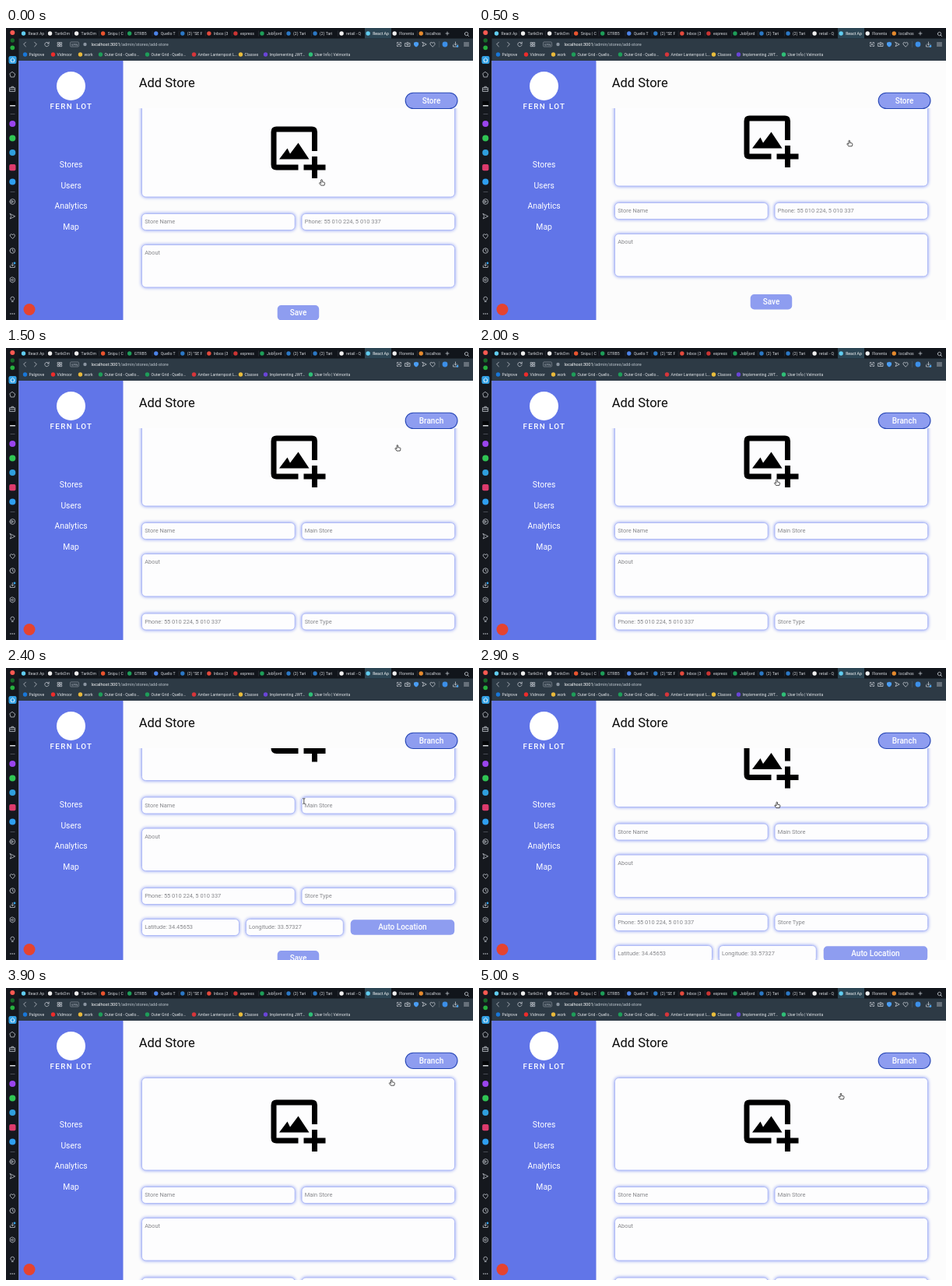
Animation, 600 px wide and 375 px high, one loop 5100 ms. Source, as an HTML page:

```html
<!DOCTYPE html>
<html lang="en">
<head>
<meta charset="utf-8">
<title>Add Store</title>
<style>
html, body { margin: 0; width: 100%; height: 100%; overflow: hidden; background: #fcfcfc; }
svg { display: block; width: 600px; height: 375px; }
text { font-family: Roboto, sans-serif; white-space: pre; }
.box { fill: #fdfdfe; stroke: #b0bbf6; stroke-width: 1; filter: drop-shadow(0 0 2.2px #8193f3); }
.line { fill: none; stroke: #bfc4cc; stroke-width: .8; stroke-linejoin: round; stroke-linecap: round; }
</style>
</head>
<body>
<svg id="stage" viewBox="0 0 600 375">
  <defs>
    <clipPath id="page"><rect x="152" y="103" width="448" height="272"/></clipPath>
  </defs>
  <rect width="600" height="375" fill="#fcfcfc"/>
  <g id="chrome"></g>
  <g id="side"></g>
  <g clip-path="url(#page)">
    <g id="form">
      <g id="shared"></g>
      <g id="storeForm"></g>
      <g id="branchForm"></g>
    </g>
  </g>
  <g id="head"></g>
  <g id="menu"></g>
  <g id="cursor">
    <path id="arrow" d="M0 0V8.2L1.9 6.5L3.2 9.3L4.4 8.8L3.2 6.1H5.8Z" fill="#111" stroke="#fff" stroke-width=".7"/>
    <path id="hand" d="M-.8 .6Q0-.5.8.6V3.2L3.4 3.7Q4.3 4 4.1 5L3.4 7.6H-.9L-2.9 4.9Q-3 3.9-2 4.1L-.8 5Z" fill="#fff" stroke="#222" stroke-width=".8" stroke-linejoin="round"/>
    <path id="beam" d="M-1.5-3.5Q0-3.5 0-2.5Q0-3.5 1.5-3.5M0-2.5V2.5M-1.5 3.5Q0 3.5 0 2.5Q0 3.5 1.5 3.5" fill="none" stroke="#222" stroke-width=".8"/>
  </g>
</svg>
<script>
const $ = id => document.getElementById(id);
const put = (id, parts) => { $(id).innerHTML = parts.join(''); };
const rect = (x, y, w, h, fill, r = 0, more = '') =>
  `<rect x="${x}" y="${y}" width="${w}" height="${h}" rx="${r}" fill="${fill}" ${more}/>`;
const dot = (x, y, r, fill) => `<circle cx="${x}" cy="${y}" r="${r}" fill="${fill}"/>`;
const text = (x, y, size, fill, str, more = '') =>
  `<text x="${x}" y="${y}" font-size="${size}" fill="${fill}" ${more}>${str}</text>`;
const mid = 'text-anchor="middle"';
const line = (x, y, d, more = '') => `<path class="line" transform="translate(${x} ${y})" d="${d}" ${more}/>`;
const ring = r => `M${-r} 0a${r} ${r} 0 1 0 ${2 * r} 0a${r} ${r} 0 1 0 ${-2 * r} 0`;
const heart = 'M0 3L-3 0Q-3.6-2.5-1.6-2.6Q-.4-2.6 0-1.4Q.4-2.6 1.6-2.6Q3.6-2.5 3 0Z';
const load = 'M0-3V1M-1.6-.6L0 1L1.6-.6M-3 .8V3H3V.8';

// Browser window
const tabs = [
  ['React Ap', '#61cdf0'], ['TarikOm', '#eee'], ['TarikOm', '#eee'], ['Snipu | C', '#e8542f'],
  ['GTRB5', '#1e9e59'], ['Quello T', '#4c83e8'], ['(2) "SE F', '#2b78c5'], ['Inbox (3', '#e34a3d'],
  ['express', '#cb3433'], ['Jobfjord', '#1e9e59'], ['(2) Tari', '#2b78c5'], ['(2) Tari', '#2b78c5'],
  ['retail - Q', '#f0f0f0'], ['React Ap', '#61cdf0'], ['Florenta', '#f0f0f0'], ['localhos', '#e58a2d']
];
const marks = [
  [24, 'Palgrove', '#1877d8'], [60, 'Vidmoor', '#ee2b2b'], [95, 'work', '#e9b93a'],
  [121, 'Outer Grid - Quello...', '#1e9e59'], [181, 'Outer Grid - Quello...', '#1e9e59'],
  [241, 'Amber Lanternpost L...', '#d8353a'], [301, 'Classes', '#e9bd3c'],
  [333, 'Implementing JWT...', '#6a45d8'], [391, 'User Info | Velmorita', '#2fbf77']
];
const active = 13;
const tabX = i => 22.5 + i * 34.05;
const chrome = [
  rect(0, 0, 600, 42, '#2d3a45'),
  rect(0, 0, 600, 13.5, '#11151b'),
  rect(461, 0, 34, 13.5, '#2d4654')
];
tabs.forEach(([name, color], i) => {
  const x = tabX(i);
  if (i && i !== active && i !== active + 1) chrome.push(rect(x - 5, 3.5, .5, 7, '#3b3f49'));
  chrome.push(dot(x, 7, 2.7, color), text(x + 6, 8.9, 5.2, i === active ? '#fff' : '#d3d6db', name));
});
chrome.push(
  line(567, 7, 'M-2 0H2M0-2V2'),
  line(591.5, 7.5, ring(2.2) + 'M1.6 1.6L3.2 3.2'),
  line(24, 21, 'M1.4-2.8L-1.4 0L1.4 2.8'),
  line(38, 21, 'M-1.4-2.8L1.4 0L-1.4 2.8'),
  line(52.5, 21, 'M2.4-1.2A2.7 2.7 0 1 0 2.6 .8M2.7-3V-1H.7'),
  line(69, 21, 'M-2.5-2.5h2v2h-2zM.7-2.5h2v2h-2zM-2.5 .7h2v2h-2zM.7 .7h2v2h-2z'),
  rect(82.5, 18, 11, 6, 'none', 1.2, 'stroke="#9aa2ac" stroke-width=".6"'),
  text(88, 22.6, 4.2, '#b4bbc4', 'VPN', mid),
  dot(101.5, 21, 2.2, '#8a94a0'),
  `<text x="109.5" y="23" font-size="5.65" fill="#bcc4cc"><tspan fill="#fff">localhost:3001</tspan>/admin/stores/add-store</text>`,
  line(505, 21, 'M-2.5-1V-2.5H-1M1-2.5H2.5V-1M2.5 1V2.5H1M-1 2.5H-2.5V1' + ring(1)),
  line(516, 21, 'M-3-1.5H-1.4L-.8-2.5H.8L1.4-1.5H3V2.5H-3Z' + ring(1.1)),
  `<path d="M527 17.7l3 1v2.5q-.5 2.3-3 3.3q-2.5-1-3-3.3v-2.5z" fill="#4a9cf2"/>`,
  line(537.5, 21, 'M-2.5-2.7L2.7 0L-2.5 2.7L-1.2 0Z'),
  line(548, 21, heart),
  rect(556, 17, .6, 8, '#4f5a65'),
  dot(564, 21, 3.4, '#3c8fe8'),
  line(577.5, 21, load), dot(580, 23.4, 1.3, '#46a3f2'),
  line(591.5, 21, 'M-3-2H3M-3 0H3M-3 2H3')
);
marks.forEach(([x, name, color]) =>
  chrome.push(dot(x + .5, 34, 2.7, color), text(x + 5.5, 36, 5.05, '#e3e6ea', name)));

chrome.push(
  rect(0, 0, 16.5, 375, '#15181e'),
  dot(8.3, 6, 3, '#ff5a52'), dot(8.3, 16, 2.7, '#176a2a'), dot(8.3, 25.3, 2.9, '#27b13f'),
  rect(3.5, 36, 10, 10, '#319fe3', 2.2),
  line(8.5, 41, 'M-2.8 0L0-2.7L2.8 0M-2 0V2.6H2V0', 'style="stroke:#fff"'),
  line(8.3, 60, 'M0-3.5L3.4-1L2.2 3H-2.2L-3.4-1Z'),
  line(8.3, 78.5, 'M-3.3-1.8H3.3V3H-3.3ZM-1.3-1.8V-3.2H1.3V-1.8M-3.3 .4H3.3'),
  rect(4.5, 94, 8, 5, '#050608', 1), rect(5, 99, 7, 1.5, '#d9dbe0', .5),
  rect(5.5, 110, 6, .8, '#555963'),
  dot(8.3, 123, 4, '#9b45ee'), dot(8.3, 141.5, 4, '#30c554'), dot(8.3, 160, 4, '#2f9fdd'),
  rect(4.2, 175, 8.3, 8.3, '#dd3b6d', 2), dot(8.3, 197.5, 4, '#2f9ff0'),
  rect(5.5, 210, 6, .8, '#555963'),
  line(8.3, 223, ring(3.4) + 'M-1-1.4L1.4 0L-1 1.4Z'),
  line(8.3, 241.8, 'M-3-3.2L3.4 0L-3 3.2L-1.7 0Z'),
  line(8.3, 267.3, heart),
  line(8.3, 286, ring(3.3) + 'M0-2V0L1.5 1'),
  line(8.3, 304.5, load), dot(11, 302, 1.4, '#369ee8'),
  line(8.3, 323.5, 'M0-3.5L3-1.8V1.8L0 3.5L-3 1.8V-1.8Z' + ring(1.2)),
  line(8.3, 348.5, 'M-1.2 1.4Q-2.7 .2-2.4-1.2Q-2-3.3 0-3.3Q2-3.3 2.4-1.2Q2.7 .2 1.2 1.4ZM-1 3H1'),
  ...[-2.4, 0, 2.4].map(d => dot(8.3 + d, 367, .8, '#c5c8cf'))
);
put('chrome', chrome);

// Site navigation
put('side', [
  rect(16.5, 42, 134, 333, '#6175e8'),
  dot(83.5, 74.5, 18.5, '#fff'),
  text(84, 104, 9.8, '#fff', 'FERN LOT', mid + ' font-weight="500" letter-spacing="1.4"'),
  ...['Stores', 'Users', 'Analytics', 'Map'].map((s, i) => text(83.6, 179.1 + i * 26.65, 10.35, '#fff', s, mid)),
  dot(30, 361.5, 7.5, '#e5432f')
]);

// Form
const area = (x, y, w, h, label = '', dy = 12.9) =>
  `<rect class="box" x="${x}" y="${y}" width="${w}" height="${h}" rx="5"/>` + text(x + 3.7, y + dy, 7.45, '#85868a', label);
const button = (x, y, w, h, label) =>
  rect(x, y, w, h, '#8e9df0', 5) + text(x + w / 2, y + h / 2 + 3.5, 10, '#fff', label, mid + ' font-weight="500"');
const left = 174.5, right = 380, wide = 196.7;
const phone = 'Phone: 55 010 224, 5 010 337';

put('shared', [
  area(left, 115.5, 402, 118.5),
  `<g transform="translate(333.5 133) scale(3.5)">
     <path d="M18 12V5Q18 4 17 4H4Q3 4 3 5V17Q3 18 4 18H12M18 14V22M14 18H22" fill="none" stroke="#000" stroke-width="2"/>
     <path d="M8 11L5 15H16L12 9L9 13Z"/>
   </g>`,
  area(left, 255.5, wide, 21, 'Store Name'),
  area(left, 295.5, 402, 54.5, 'About')
]);
put('storeForm', [area(right, 255.5, wide, 21, phone), button(348.7, 373, 53.5, 19.5, 'Save')]);
put('branchForm', [
  area(right, 255.5, wide, 21, 'Main Store'),
  area(left, 372, wide, 21, phone),
  area(right, 372, wide, 21, 'Store Type'),
  area(left, 412, 125, 21, 'Latitude: 34.45653'),
  area(308.3, 412, 125, 21, 'Longitude: 33.57327'),
  button(442.7, 412.7, 133.5, 19.5, 'Auto Location'),
  button(348.7, 452.5, 53.5, 19.5, 'Save')
]);
put('head', [
  text(170.7, 76.3, 16.5, '#0b0b0b', 'Add Store'),
  rect(513.2, 83.2, 66.8, 20.3, '#8e9df0', 10.15, 'stroke="#2545b5" stroke-width="1.1"'),
  text(546.5, 96.9, 10, '#fff', 'Store', mid + ' font-weight="500" id="kind"')
]);

const inter = 'style="font-family:Inter,sans-serif"';
put('menu', [
  rect(510, 85.7, 67, 34, '#414859', 3, 'stroke="#2a303d" stroke-width=".8" style="filter:drop-shadow(0 1px 2px #0007)"'),
  rect(512, 102.7, 63, 14.8, '#3f89e2', 2),
  line(515.8, 95.2, 'M-1.5 .2L-.4 1.6L1.7-1.7', 'style="stroke:#fff"'),
  text(520, 98.4, 9.2, '#fff', 'Store', inter),
  text(520, 113.4, 9.2, '#fff', 'Branch', inter)
]);

// Motion: [time, value...]
const LOOP = 5100, STEP = 100, OPEN = 800, PICK = 1300;
const scroll = [[0, 17], [200, 31], [2000, 31], [2200, 55], [2400, 89.5], [2600, 111], [2700, 111], [3100, 0]];
const path = [
  [0, 405.5, 194.5], [300, 405.5, 194.5], [700, 546, 94], [900, 546, 95], [1100, 545, 107.5], [1300, 545, 109],
  [1900, 382.5, 168.8], [2100, 382.5, 168.8], [2400, 382.8, 171], [2900, 382.8, 172], [3100, 383, 176.3],
  [3300, 383, 176.3], [3900, 495.3, 117.6], [4200, 485, 123], [4800, 465, 135.2]
];
const linear = u => u;
const smooth = u => u * u * (3 - 2 * u);
function at(keys, t, ease) {
  const n = keys.findIndex(k => k[0] > t);
  if (n < 0) return keys[keys.length - 1].slice(1);
  const a = keys[n - 1], b = keys[n], u = ease((t - a[0]) / (b[0] - a[0]));
  return a.slice(1).map((v, i) => v + (b[i + 1] - v) * u);
}

function pointer(x, y, s, open) {
  if (open) return 'arrow';
  if (x > 513 && x < 580 && y > 83 && y < 104) return 'hand';
  if (y < 103 || x < left || x > 576.5) return 'arrow';
  const py = y + s;
  if (py > 115.5 && py < 234) return 'hand';
  const inField = (py > 255.5 && py < 276.5 && (x < 371.5 || x > right)) || (py > 295.5 && py < 350);
  return inField ? 'beam' : 'arrow';
}

const show = (id, on) => $(id).setAttribute('display', on ? 'inline' : 'none');

function draw(now) {
  const t = Math.floor((now % LOOP) / STEP) * STEP;
  const [s] = at(scroll, t, linear);
  const [x, y] = at(path, t, smooth);
  const branch = t >= PICK, open = t >= OPEN && t < PICK;
  $('form').setAttribute('transform', `translate(0 ${-s})`);
  show('storeForm', !branch);
  show('branchForm', branch);
  show('menu', open);
  $('kind').textContent = branch ? 'Branch' : 'Store';
  $('cursor').setAttribute('transform', `translate(${x} ${y})`);
  const kind = pointer(x, y, s, open);
  ['arrow', 'hand', 'beam'].forEach(id => show(id, id === kind));
}

let start;
function tick(now) {
  start ??= now;
  draw(now - start);
  requestAnimationFrame(tick);
}
draw(0);
requestAnimationFrame(tick);
</script>
</body>
</html>
```
